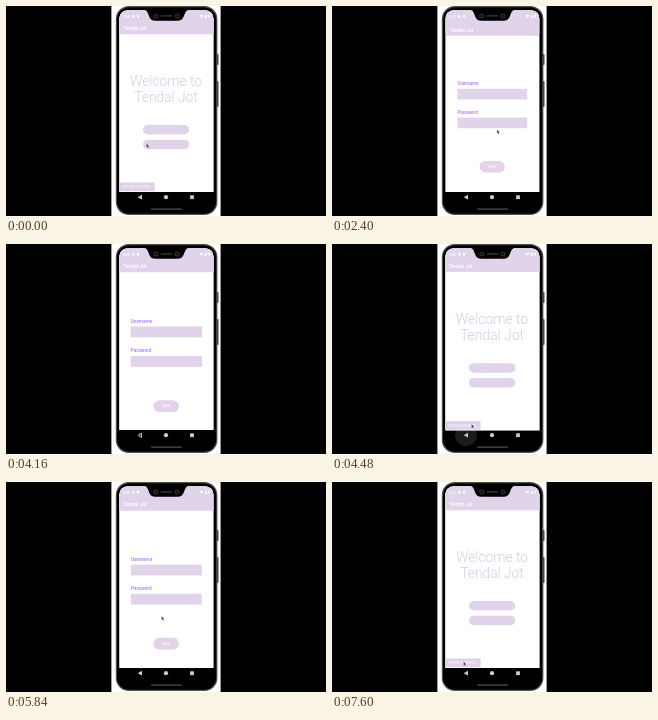
Write an HTML page with a canvas that moves like this. It is 320 by 210 pixels and loops after 8000 ms.

```html
<!DOCTYPE html>
<html lang="en">
<head>
<meta charset="utf-8">
<title>Tendal Jot</title>
<style>
html, body { margin: 0; width: 100%; height: 100%; overflow: hidden; background: #000; }
canvas { display: block; width: 320px; height: 210px; }
</style>
</head>
<body>
<canvas id="stage"></canvas>
<script>
const W = 320, H = 210, LOOP = 8000, STEP = 80;
const CX = 160, CY = 95;
const APP = 'Tendal Jot';
const LILAC = '#e1d4ea';
const canvas = document.getElementById('stage');
const ctx = canvas.getContext('2d');
const dpr = window.devicePixelRatio || 1;
canvas.width = W * dpr;
canvas.height = H * dpr;

// Page changes
const CHANGE_MS = 400;
const CHANGES = [
  { at: 2240, open: true },
  { at: 4240, open: false },
  { at: 5600, open: true },
  { at: 6960, open: false }
];

// Pointer stops: each is reached at its time after one glide
const GLIDE_MS = 400;
const STOPS = [
  { at: 0, x: 140.5, y: 137.5 },
  { at: 480, x: 153.3, y: 120.5 },
  { at: 1760, x: 165, y: 123.5 },
  { at: 3280, x: 157, y: 172 },
  { at: 3760, x: 132.5, y: 190 },
  { at: 4480, x: 139.5, y: 180 },
  { at: 4960, x: 155.5, y: 134 },
  { at: 6320, x: 157, y: 172 },
  { at: 6800, x: 132.5, y: 189 },
  { at: 7600, x: 131.5, y: 179.5 }
];

const clamp = v => Math.max(0, Math.min(1, v));
const easeOut = p => 1 - (1 - p) ** 3;
const smooth = p => p * p * (3 - 2 * p);
const mix = (a, b, p) => a + (b - a) * p;
const latest = (list, t) => list.findLast(item => item.at <= t);

function rect(x, y, w, h, color) {
  ctx.fillStyle = color;
  ctx.fillRect(x, y, w, h);
}

function round(x, y, w, h, r, color) {
  ctx.fillStyle = color;
  ctx.beginPath();
  ctx.roundRect(x, y, w, h, r);
  ctx.fill();
}

function pill(x, y, w, h, color) {
  round(x, y, w, h, h / 2, color);
}

function dot(x, y, r, color) {
  ctx.fillStyle = color;
  ctx.beginPath();
  ctx.arc(x, y, r, 0, Math.PI * 2);
  ctx.fill();
}

function shape(points, color) {
  ctx.fillStyle = color;
  ctx.beginPath();
  points.forEach(([x, y]) => ctx.lineTo(x, y));
  ctx.closePath();
  ctx.fill();
}

function text(str, x, y, size, color, align = 'left', weight = 500) {
  ctx.font = `${weight} ${size}px Roboto, sans-serif`;
  ctx.textAlign = align;
  ctx.fillStyle = color;
  ctx.fillText(str, x, y);
}

function page() {
  rect(113, 0, 95, 186, '#fff');
  rect(113, 0, 95, 28.3, LILAC);
  text(APP, 117, 24, 5, '#fff');
}

function welcome() {
  page();
  ['Welcome to', APP].forEach((line, i) =>
    text(line, CX, 80.2 + 15.8 * i, 13.8, '#d6c9e4', 'center', 300));
  for (const y of [119, 133.7]) pill(137, y, 46.3, 9.5, LILAC);
  rect(113, 176.5, 35.6, 8.7, '#dfd2e8');
  text('VIEW MY RECORDS', 116, 182, 3.2, '#f6f0fa');
}

function login() {
  page();
  ['Username', 'Password'].forEach((label, i) => {
    const y = 79 + 29.4 * i;
    text(label, 124.7, y, 4.7, '#a678ff');
    rect(124.7, y + 3.5, 71.3, 10.9, LILAC);
  });
  pill(147.3, 156.2, 25.7, 11.8, '#e3d2e8');
  text('SAVE', CX, 163.3, 3.2, '#fff', 'center');
}

function layer(paint, scale, alpha) {
  ctx.save();
  ctx.globalAlpha = alpha;
  ctx.translate(CX, CY);
  ctx.scale(scale, scale);
  ctx.translate(-CX, -CY);
  paint();
  ctx.restore();
}

function screen(t) {
  const change = latest(CHANGES, t);
  const p = change ? clamp((t - change.at) / CHANGE_MS) : 1;
  const e = easeOut(p);
  const fade = clamp(p * 3);
  const open = change && change.open;
  ctx.save();
  ctx.beginPath();
  ctx.roundRect(113.4, 4.5, 94, 193, [8, 8, 0, 0]);
  ctx.clip();
  if (open) {
    layer(welcome, 1 + 0.1 * e, 1 - fade);
    layer(login, 0.9 + 0.1 * e, fade);
  } else {
    layer(welcome, 1.1 - 0.1 * e, 1);
    if (change) layer(login, 1 - 0.1 * e, 1 - fade);
  }
  ctx.restore();
}

function backdrop() {
  rect(113, 4, 95, 182, '#fff');
  rect(113, 4, 95, 24, LILAC);
}

function status() {
  text('8:42', 117, 11.6, 3.4, '#fff');
  dot(127.3, 10.2, 1.2, '#fff');
  round(131, 9, 2.2, 2.6, 0.5, '#fff');
  shape([[193.5, 9], [197.3, 9], [195.4, 11.8]], '#fff');
  shape([[201, 8.6], [201, 11.6], [198, 11.6]], '#fff');
  round(202.3, 8.6, 1.6, 3, 0.4, '#fff');
}

function body() {
  rect(105.4, 0, 109.2, H, '#fff');
  round(210.8, 48, 1.7, 11, 0.8, '#444');
  round(210.8, 75, 1.7, 26, 0.8, '#444');
  round(109.8, 0, 101.6, 209, 13, '#505050');
  round(111, 1.2, 99.2, 206.6, 12, '#000');
}

function notch() {
  ctx.fillStyle = '#000';
  ctx.beginPath();
  ctx.moveTo(138, 4);
  ctx.bezierCurveTo(144, 4, 141, 14.7, 149, 14.7);
  ctx.lineTo(172, 14.7);
  ctx.bezierCurveTo(180, 14.7, 177, 4, 183, 4);
  ctx.fill();
  for (const x of [149.8, 171]) {
    dot(x, 10, 2.5, '#303030');
    dot(x, 10, 1.5, '#111');
  }
  pill(154.5, 9, 12, 1.8, '#2c2c2c');
}

function nav(t) {
  const change = latest(CHANGES, t);
  if (change && !change.open) {
    const glow = 0.22 * (1 - clamp((t - change.at) / 480));
    dot(134, 191, 11, `rgba(255,255,255,${glow})`);
  }
  shape([[131.6, 191.2], [136, 188.8], [136, 193.6]], '#ccc');
  dot(CX, 191.2, 2.1, '#ccc');
  rect(184.1, 189.3, 3.8, 3.8, '#ccc');
  pill(145, 202.3, 31, 1.8, '#383838');
}

function pointer(t) {
  const from = latest(STOPS, t);
  const to = STOPS[STOPS.indexOf(from) + 1] || from;
  const p = smooth(clamp((t - to.at) / GLIDE_MS + 1));
  ctx.save();
  ctx.translate(mix(from.x, to.x, p), mix(from.y, to.y, p));
  shape([[0, 0], [0, 4], [0.9, 3.3], [1.6, 4.9], [2.3, 4.6], [1.6, 3.1], [2.8, 3]], '#222');
  ctx.strokeStyle = 'rgba(255,255,255,0.75)';
  ctx.lineWidth = 0.4;
  ctx.stroke();
  ctx.restore();
}

function draw(t) {
  ctx.setTransform(dpr, 0, 0, dpr, 0, 0);
  rect(0, 0, W, H, '#000');
  body();
  ctx.save();
  ctx.beginPath();
  ctx.roundRect(113.4, 4.5, 94, 193, [8, 8, 0, 0]);
  ctx.clip();
  backdrop();
  ctx.restore();
  screen(t);
  notch();
  status();
  nav(t);
  pointer(t);
}

const start = performance.now();
function tick() {
  const t = (performance.now() - start) % LOOP;
  draw(Math.floor(t / STEP) * STEP);
  requestAnimationFrame(tick);
}
tick();
</script>
</body>
</html>
```
